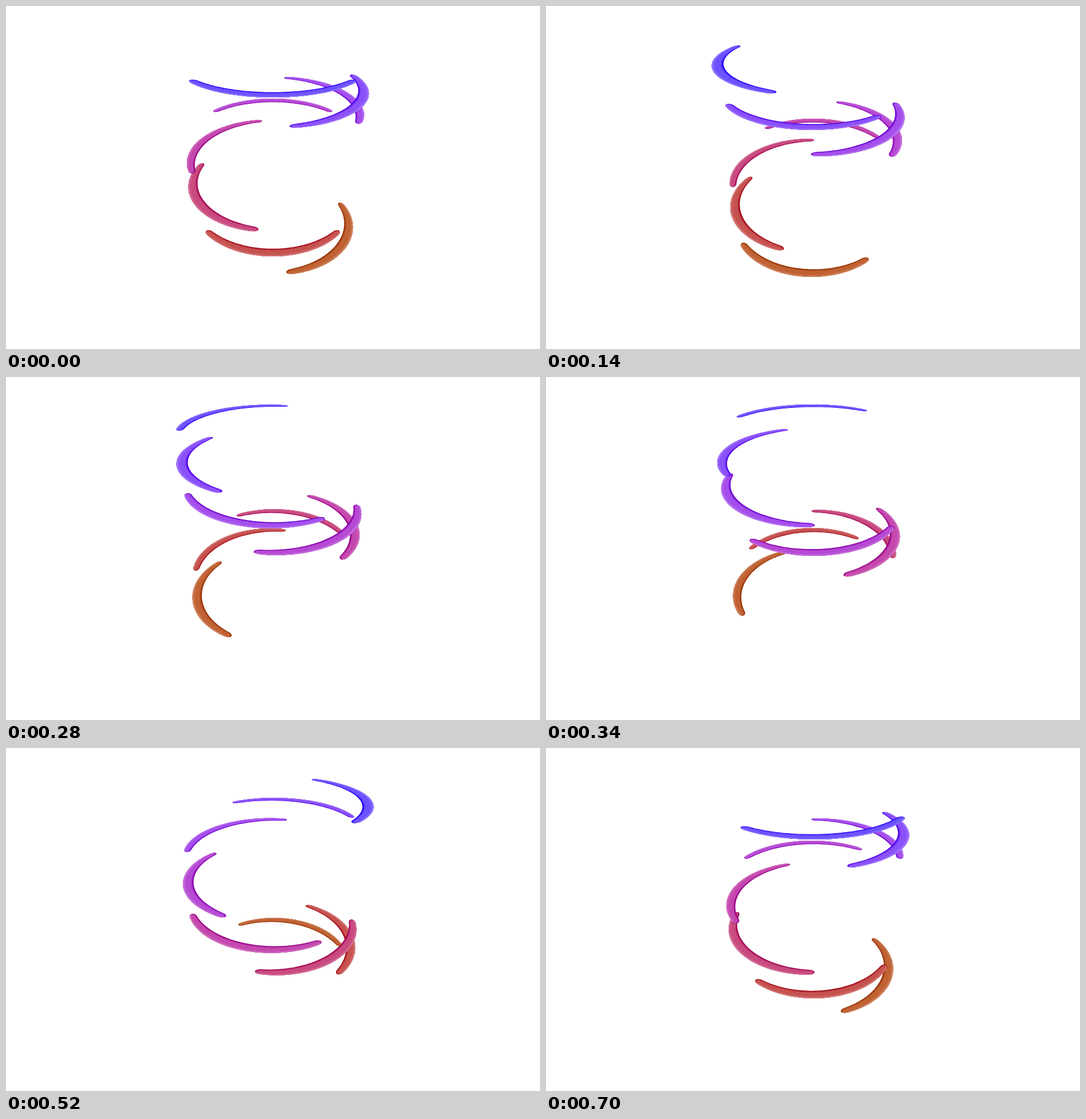
An HTML page with a canvas that plays this animation: 933x600 px, repeating every 720 ms.

```html
<!DOCTYPE html>
<html lang="en">
<head>
<meta charset="utf-8">
<title>Spinning arcs</title>
<style>
html, body { margin: 0; width: 100%; height: 100%; overflow: hidden; background: #fff; }
canvas { display: block; }
</style>
</head>
<body>
<canvas id="stage" width="933" height="600"></canvas>
<script>
const ctx = document.getElementById('stage').getContext('2d');
const LOOP = 720, STEP = 20, CX = 466.2;
const RAD = Math.PI / 180;
const INNER = 0.885, HALF_ARC = 51;

// Outer ellipse of each ring [rx, ry, cy], its inner edge colour and its body colour
const rings = [
  [176.8, 56, 104, [34, 4, 250], [108, 82, 255]],
  [168.5, 65, 152, [80, 0, 235], [138, 80, 250]],
  [161.5, 71.5, 193.5, [108, 0, 208], [164, 78, 236]],
  [157, 75.5, 237.5, [138, 0, 176], [182, 74, 212]],
  [152.2, 81, 278, [150, 0, 132], [196, 72, 174]],
  [148.2, 84, 315, [162, 0, 82], [200, 74, 126]],
  [144.4, 87, 351, [164, 8, 22], [198, 82, 80]],
  [140.5, 88.5, 385.5, [150, 48, 0], [192, 98, 52]]
].map(([rx, ry, cy, edge, body]) => ({ rx, ry, cy, edge, body, e: rx * 0.00109 }));

const mix = (a, b, k) => `rgb(${a.map((v, i) => Math.round(v + (b[i] - v) * k))})`;

// Perspective image of the ring point at radius rho (1 = outer edge) and angle in degrees
function project({ rx, ry, cy, e }, rho, deg) {
  const s = Math.sin(deg * RAD), c = Math.cos(deg * RAD);
  const q = rho / (1 - e * rho * s), f = 1 - e * e;
  return [CX + rx * Math.sqrt(f) * c * q, cy - ry * e + ry * f * s * q];
}

// Part of the tapered arc between two fractions of its thickness (0 = inner, 1 = outer)
function band(ring, mid, half, from, to, color) {
  const side = (delta, frac) => {
    const cap = Math.sqrt(Math.max(0, Math.min(1, (half - Math.abs(delta)) / 2.5 + 0.12)));
    const width = (1 - INNER) * Math.cos(delta * RAD) * cap;
    const rho = (1 + INNER) / 2 + (frac - 0.5) * width;
    ctx.lineTo(...project(ring, rho, mid + delta));
  };
  const n = 60;
  ctx.beginPath();
  for (let i = 0; i <= n; i++) side(half * (2 * i / n - 1), from);
  for (let i = n; i >= 0; i--) side(half * (2 * i / n - 1), to);
  ctx.closePath();
  ctx.fillStyle = color;
  ctx.fill();
}

function drawArc(ring, mid) {
  const { edge, body } = ring, white = [255, 255, 255];
  band(ring, mid, HALF_ARC, 0, 1, mix(edge, body, 0));
  band(ring, mid, HALF_ARC - 0.8, 0.13, 1, mix(edge, body, 0.7));
  band(ring, mid, HALF_ARC - 0.8, 0.24, 1, mix(edge, body, 1));
  band(ring, mid, HALF_ARC - 0.8, 0.75, 1, mix(body, white, 0.08));
  band(ring, mid, HALF_ARC - 0.8, 0.9, 1, mix(body, white, 0.25));
}

const start = performance.now();

function frame() {
  const t = (performance.now() - start) % LOOP;
  const turn = Math.floor(t / STEP) * STEP / LOOP * 360;
  ctx.clearRect(0, 0, 933, 600);
  for (let i = rings.length - 1; i >= 0; i--) drawArc(rings[i], 90 + turn - 60 * i);
  requestAnimationFrame(frame);
}
frame();
</script>
</body>
</html>
```
